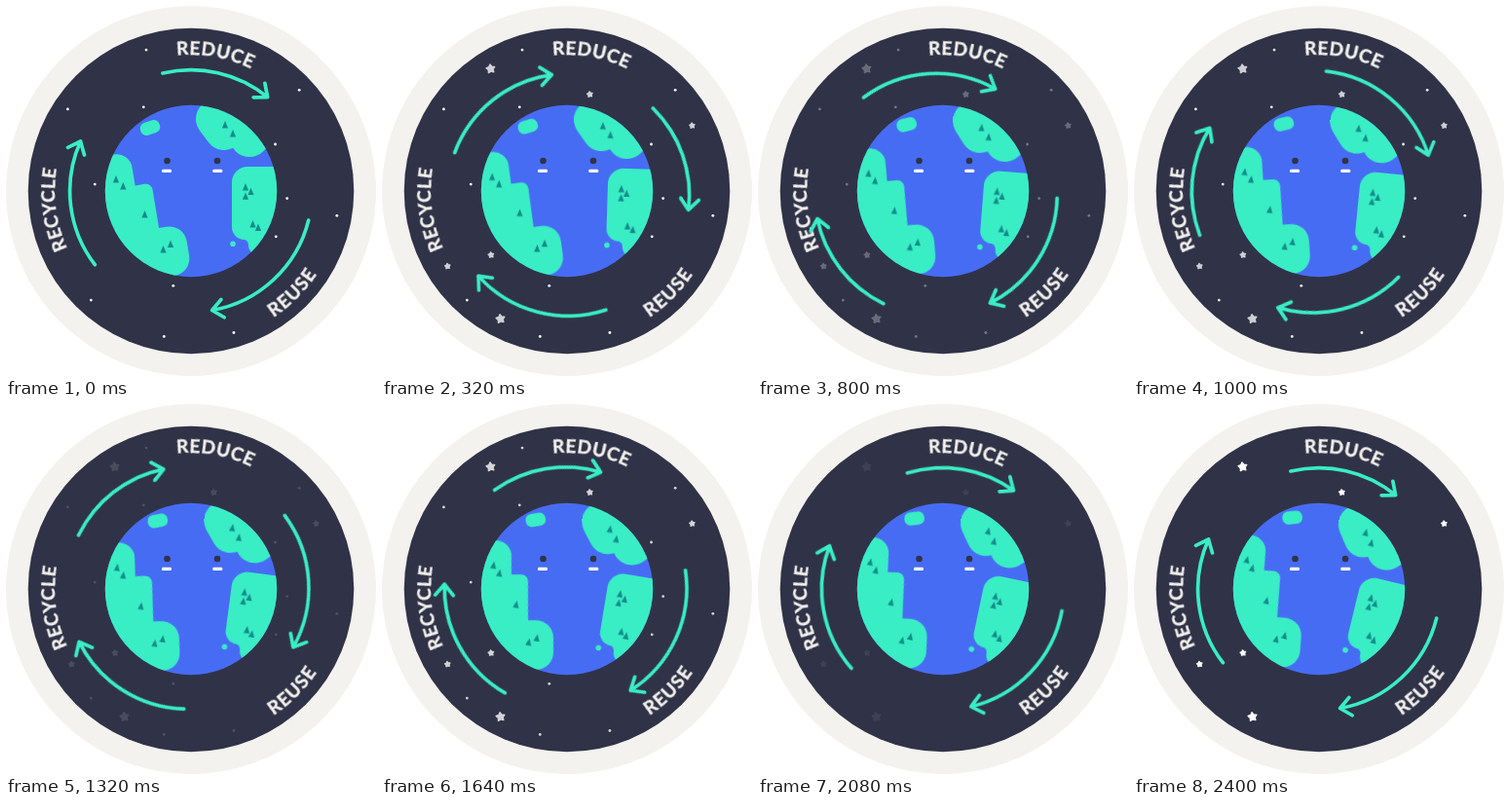
Recreate the animation shown at these times as an HTML page. Size 380 by 380 pixels, loop 2440 ms.

```html
<!DOCTYPE html>
<html lang="en">
<head>
<meta charset="utf-8">
<title>Reduce, reuse, recycle</title>
<style>
  html, body { margin: 0; width: 100%; height: 100%; overflow: hidden; background: #fff; }
  svg { display: block; width: 100%; height: 100%; }
  text {
    font: 700 19px Lato, sans-serif; letter-spacing: .6px; text-anchor: middle;
    fill: #f4f2ee; stroke: #f4f2ee; stroke-width: .4;
  }
  .line { fill: none; stroke: #39edc4; stroke-width: 3.7; stroke-linecap: round; stroke-linejoin: round; }
  #arrows, #land, #stars, #dots { animation: 2440ms linear infinite; }
  #arrows { transform-origin: 187.1px 193.1px; animation-name: orbit; }
  #land { transform-origin: 190px 182px; animation-name: drift; fill: #39edc4; }
  #stars { animation-name: twinkle; }
  #dots { animation-name: blink; }
  @keyframes orbit {
    0% { transform: rotate(0deg); animation-timing-function: cubic-bezier(.213, 0, .187, 1); }
    98.36%, 100% { transform: rotate(360deg); }
  }
  @keyframes drift {
    to { transform: rotate(13.9deg); }
  }
  @keyframes twinkle {
    0%, 28.1%, 56.2%, 84.3% { opacity: 0; }
    14%, 42.2% { opacity: .83; }
    70.2%, 98.36%, 100% { opacity: 1; }
  }
  @keyframes blink {
    0%, 14%, 42.2%, 70.2% { opacity: 1; }
    28.1%, 56.2%, 84.3%, 100% { opacity: 0; }
  }
</style>
</head>
<body>
<svg viewBox="0 0 380 380">
  <defs>
    <clipPath id="globe"><circle cx="190" cy="190" r="88.2"/></clipPath>
    <path id="over" d="M-140 0A140 140 0 0 1 140 0"/>
    <path id="under" d="M-155 0A155 155 0 0 0 155 0"/>
  </defs>

  <circle cx="190" cy="190" r="190" fill="#f4f2ee"/>
  <circle cx="190" cy="190" r="167.3" fill="#303347"/>

  <g id="dots" fill="#fff"></g>
  <g id="stars" fill="#fff" stroke="#fff" stroke-width="1.4" stroke-linejoin="round"></g>

  <g transform="translate(190 190)">
    <text transform="rotate(10.2)"><textPath href="#over" startOffset="50%">REDUCE</textPath></text>
    <text transform="rotate(-97.6)"><textPath href="#over" startOffset="50%">RECYCLE</textPath></text>
    <text transform="rotate(-45)" style="letter-spacing:1.2px"><textPath href="#under" startOffset="50%">REUSE</textPath></text>
  </g>

  <g id="arrows" class="line"></g>

  <g clip-path="url(#globe)">
    <circle cx="190" cy="190" r="89" fill="#476cf4"/>
    <g id="land">
      <path d="M240 100L215 116L224 128ZM250 135L285 100" stroke="#39edc4" stroke-width="40" stroke-linecap="round" stroke-linejoin="round"/>
      <path d="M290 165H248a16 16 0 0 0-16 16V227a13 13 0 0 0 13 13q4 1 4 6q0 6 8 11L290 260Z"/>
      <path transform="rotate(-9.4 190 182)" d="M90 140H117a16 16 0 0 1 16 16V175H143a7 7 0 0 1 7 7V222H158a18 18 0 0 1 18 18V255a18 18 0 0 1-18 18L150 290H90Z"/>
      <rect x="137.7" y="118.3" width="20.6" height="13.4" rx="6" transform="rotate(-18 148 125)"/>
      <circle cx="233" cy="244.3" r="2.8"/>
      <g id="trees" fill="#128d8b"></g>
    </g>
  </g>

  <g fill="#303347">
    <circle cx="165.5" cy="159" r="3.3"/>
    <circle cx="217" cy="159" r="3.3"/>
  </g>
  <g fill="#fff">
    <rect x="160" y="167.8" width="10" height="3.2" rx="1.2"/>
    <rect x="212.3" y="167.8" width="10" height="3.2" rx="1.2"/>
  </g>
</svg>
<script>
  const add = (id, tag, attrs) => {
    const el = document.createElementNS("http://www.w3.org/2000/svg", tag);
    for (const key in attrs) el.setAttribute(key, attrs[key]);
    document.getElementById(id).append(el);
  };
  const polar = (r, deg, [x, y] = [190, 190]) => {
    const a = deg * Math.PI / 180;
    return [x + r * Math.cos(a), y + r * Math.sin(a)];
  };

  // Arc from one angle to another, with an open head at its end
  const arrow = (from, to, r = 124.4) => {
    const tip = polar(r, to);
    const wing = turn => polar(14.5, to - 90 + turn, tip);
    add("arrows", "path", {
      d: `M${polar(r, from)}A${r} ${r} 0 0 1 ${tip}M${wing(-40)}L${tip}L${wing(40)}`
    });
  };
  arrow(-103.5, -50.8);
  arrow(14, 80);
  arrow(142.5, 204.2);

  // The sky is strewn along two rings around the globe
  const ring = (r, draw, ...angles) => angles.forEach(deg => draw(polar(r, deg)));
  const dot = ([cx, cy]) => add("dots", "circle", { cx, cy, r: 1.4 });
  const star = size => center => {
    const points = Array.from({ length: 10 }, (_, i) =>
      polar(i % 2 ? size * .56 : size, i * 36 - 98, center));
    add("stars", "polygon", { points: points.join(" ") });
  };
  ring(99, dot, 4.4, 28.2, 100.6, 184, 240.5, 331);
  ring(152, dot, 9.6, 73.2, 100.5, 132.5, 213.6, 252.4, 317);
  ring(102, star(2.9), 139.9, 283.3);
  ring(145, star(2.8), 147.8, 332.4);
  ring(148, star(4.6), 117.5, 238);

  // Trees zigzag by dx while stepping down by dy
  const grove = (x, y, dx, dy, count = 2) => {
    for (let i = 0; i < count; i++)
      add("trees", "path", { d: `M${x + i % 2 * dx} ${y + i * dy - 4}l3.1 7.4h-6.2z` });
  };
  grove(225, 122, 8, 9);
  grove(113, 178, 7.3, 7);
  grove(142.5, 214, 0, 0, 1);
  grove(161.5, 250, 7.5, -5.5);
  grove(246, 186, 5.5, 4.7, 3);
  grove(253.5, 224, 5.5, 3.5);
</script>
</body>
</html>
```
